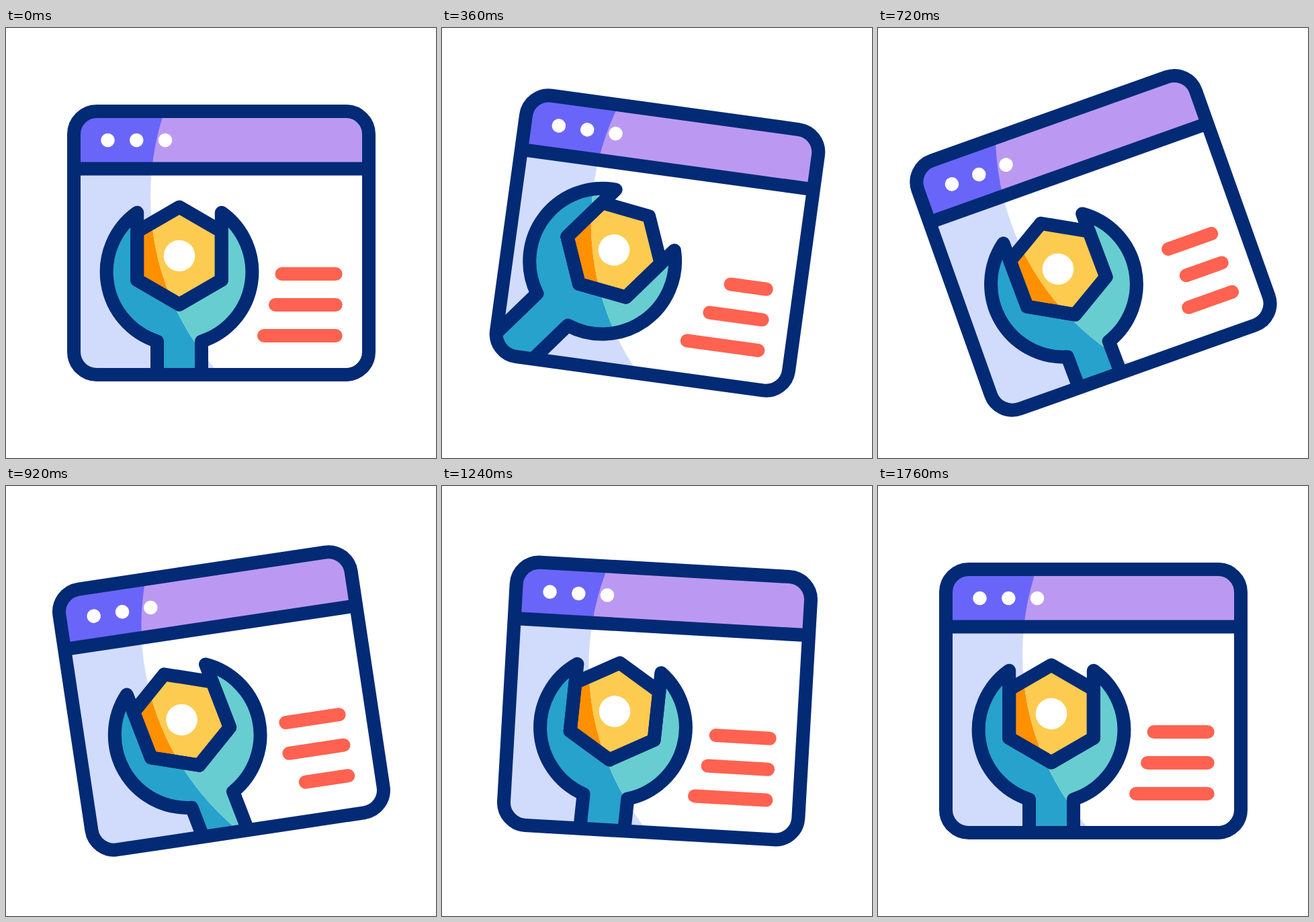
These frames come from a looping animation (640x640 px, 1880 ms). An HTML page:

```html
<!DOCTYPE html>
<html lang="en">
<head>
<meta charset="utf-8">
<title>Browser repair</title>
<style>
  html, body { margin: 0; width: 100%; height: 100%; overflow: hidden; background: #fff; }
  svg { display: block; width: 100%; height: 100%; }
  .ink { fill: none; stroke: #032a75; stroke-width: 20; stroke-linejoin: round; }
  .lines { stroke: #ff6250; stroke-width: 20; stroke-linecap: round; }
</style>
</head>
<body>
<svg viewBox="0 0 640 640">
  <defs>
    <rect id="frame" x="101" y="124" width="439" height="392" rx="34"/>
    <path id="jaw" d="M195.2 274.7V375.2L258 411.5L320.8 375.2V274.7A108.5 108.5 0 0 1 291 466.4V700H225V466.4A108.5 108.5 0 0 1 195.2 274.7Z"/>
    <path id="nut" d="M258 266.5L320.8 302.8V375.2L258 411.5L195.2 375.2V302.8Z"/>
    <clipPath id="inside"><use href="#frame"/></clipPath>
    <clipPath id="lit"><circle cx="608" cy="250" r="393"/></clipPath>
  </defs>
  <g id="win">
    <g clip-path="url(#inside)">
      <!-- shaded side -->
      <path fill="#d1dcfd" d="M101 209H540V516H101Z"/>
      <path fill="#6a65f9" d="M101 124H540V209H101Z"/>
      <g class="spin">
        <use href="#jaw" fill="#27a2cd"/>
        <use href="#nut" fill="#ff9100"/>
      </g>
      <!-- lit side, its edge fixed to the window -->
      <g clip-path="url(#lit)">
        <path fill="#fff" d="M101 209H540V516H101Z"/>
        <path fill="#bb99f2" d="M101 124H540V209H101Z"/>
        <g class="spin">
          <use href="#jaw" fill="#67cdd1"/>
          <use href="#nut" fill="#fdcb50"/>
        </g>
      </g>
      <g class="spin ink">
        <use href="#jaw"/>
        <use href="#nut"/>
      </g>
      <g fill="#fff">
        <circle cx="258" cy="339" r="23.3"/>
        <circle cx="151.5" cy="167" r="10.3"/>
        <circle cx="194.3" cy="167" r="10.3"/>
        <circle cx="237" cy="167" r="10.3"/>
      </g>
      <g class="lines">
        <line x2="490.7" y1="366" y2="366"/>
        <line x2="490.7" y1="412" y2="412"/>
        <line x2="490.7" y1="458" y2="458"/>
      </g>
    </g>
    <g class="ink">
      <path d="M101 209.5H540"/>
      <use href="#frame"/>
    </g>
  </g>
</svg>
<script>
  const LOOP = 1880, STEP = 40, LAST = 1760;
  // keys: [time, degrees]
  const tilt = [[0, 0], [416, 8.2], [432, 8.2], [750, -20.3], [1118, 6.3], [1420, -2.1], [1680, 0]];
  const turn = [[135, 0], [515, 60], [815, -20], [1112, 6], [1420, -2.5], [1760, 0]];
  // left end, shrink amount, time of the shortest length
  const bars = [[410.5, 33, 478], [401, 38.5, 628], [384, 47.5, 838]];
  const HALF = 410;

  const win = document.getElementById('win');
  const spins = document.querySelectorAll('.spin');
  const lines = document.querySelectorAll('.lines line');

  const smooth = p => {
    p = Math.min(1, Math.max(0, p));
    return p * p * (3 - 2 * p);
  };

  function sample(keys, t) {
    let v = keys[0][1];
    for (let i = 1; i < keys.length; i++) {
      const [t0, v0] = keys[i - 1], [t1, v1] = keys[i];
      if (t >= t0) v = v0 + (v1 - v0) * smooth((t - t0) / (t1 - t0));
    }
    return v;
  }

  function draw(now) {
    const t = Math.min(LAST, Math.floor(now % LOOP / STEP) * STEP);
    win.setAttribute('transform', `rotate(${sample(tilt, t)} 320 320)`);
    spins.forEach(s => s.setAttribute('transform', `rotate(${sample(turn, t)} 258 339)`));
    bars.forEach(([x, shrink, peak], i) =>
      lines[i].setAttribute('x1', x + shrink * smooth(1 - Math.abs(t - peak) / HALF)));
  }

  const start = performance.now();
  function tick() {
    draw(performance.now() - start);
    requestAnimationFrame(tick);
  }
  tick();
</script>
</body>
</html>
```
